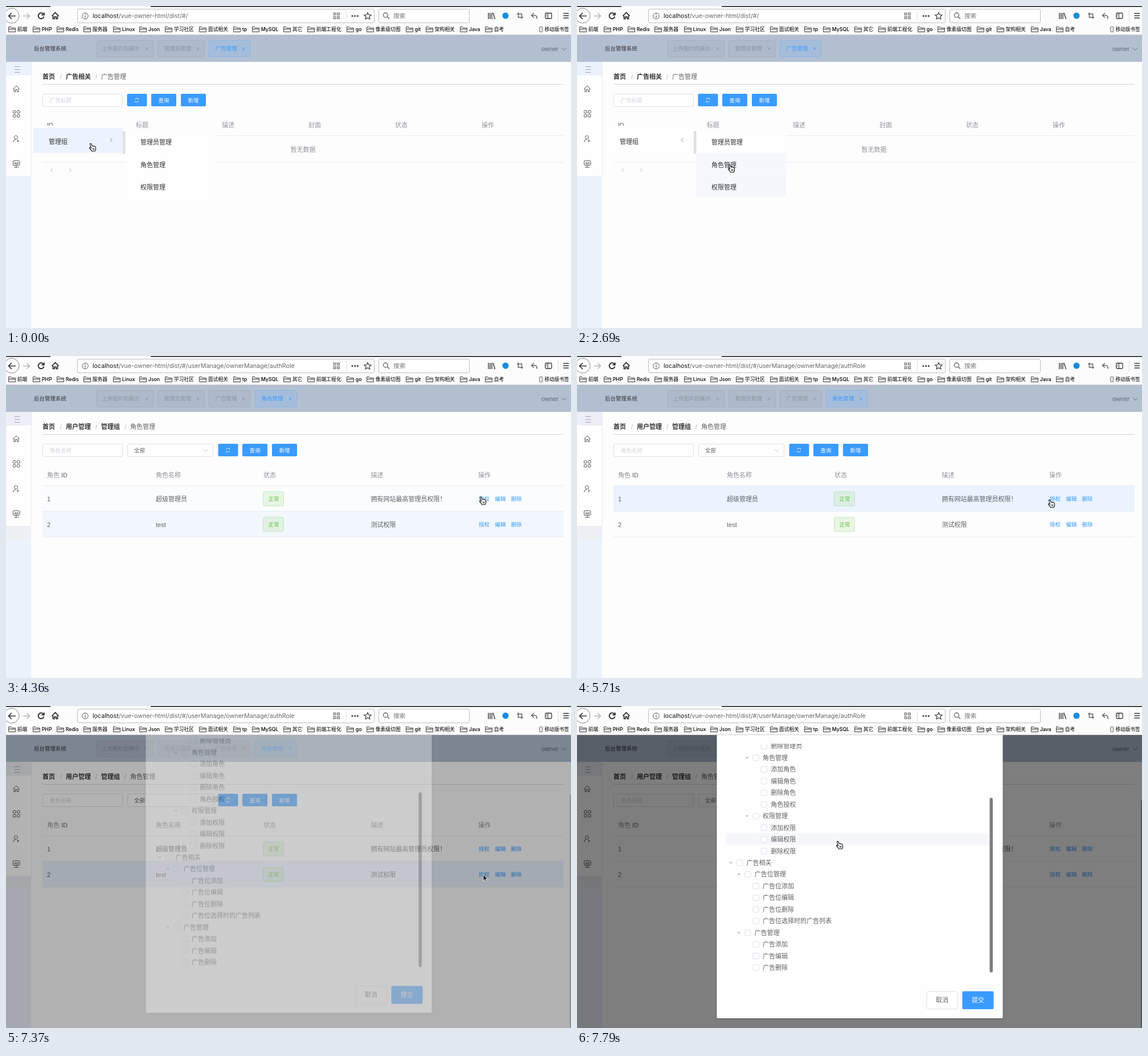
Animation, 992 px wide and 565 px high, one loop 8 s. Source, as an HTML page:

```html
<!DOCTYPE html>
<html lang="zh-CN">
<head>
<meta charset="utf-8">
<title>后台管理系统</title>
<style>
  html, body { margin: 0; width: 100%; height: 100%; overflow: hidden; background: #fdfdfd; }
  svg { display: block; width: 100vw; height: 100vh; font-family: "Liberation Sans", "Noto Sans CJK SC", "Noto Sans CJK", sans-serif; }
  .ui { font-family: Inter, "Noto Sans CJK SC", "Noto Sans CJK", sans-serif; }
  text { white-space: pre; }
</style>
</head>
<body>
<svg id="stage" viewBox="0 0 992 565"></svg>
<script>
const BLUE = '#3a9bff', HOVER = '#ebf3fe', GRAY = '#909399', BODY = '#606266', DARK = '#303133', EDGE = '#dcdfe6';

const rect = (x, y, w, h, fill, extra = '') =>
  `<rect x="${x}" y="${y}" width="${w}" height="${h}" fill="${fill}" ${extra}/>`;
const box = (x, y, w, h, fill, stroke, r = 2.5) =>
  rect(x + .5, y + .5, w - 1, h - 1, fill, `stroke="${stroke}" rx="${r}"`);
const text = (x, y, s, fill = BODY, size = 11, extra = '') =>
  `<text x="${x}" y="${y + size * .36}" fill="${fill}" font-size="${size}" ${extra}>${s}</text>`;
const path = (d, stroke = '#333', width = 1, fill = 'none') =>
  `<path d="${d}" stroke="${stroke}" stroke-width="${width}" fill="${fill}"/>`;
const circle = (x, y, r, fill = 'none', stroke = 'none', width = 1) =>
  `<circle cx="${x}" cy="${y}" r="${r}" fill="${fill}" stroke="${stroke}" stroke-width="${width}"/>`;
const rule = (x1, x2, y, color = '#e8ebf1') => path(`M${x1} ${y}H${x2}`, color);
const group = (id, content, extra = '') => `<g id="${id}" ${extra}>${content}</g>`;
const highlight = (id, x, y, w, h) => rect(x, y, w, h, HOVER, `id="${id}"`);
const BOLD = 'font-weight="700"', MEDIUM = 'font-weight="500"';
const ID_LABEL = `<tspan ${BOLD}>ID</tspan>`;

function browser() {
  const folder = x => path(`M${x + .5} 45.5V36.5H${x + 4.5}L${x + 6} 38.5H${x + 12.5}V45.5Z`, '#4a4a4a', 1, '#e4e4e4')
    + path(`M${x + .5} 40.5H${x + 12.5}`, '#4a4a4a');
  const bookmarks = [[4, '前端'], [47, 'PHP'], [89, 'Redis'], [136, '服务器'], [188, 'Linux'], [234, 'Json'],
    [279, '学习社区'], [339, '面试相关'], [399, 'tp'], [432, 'MySQL'], [487, '其它'], [529, '前端工程化'], [598, 'go'],
    [633, '像素级切图'], [702, 'git'], [737, '架构相关'], [797, 'Java'], [841, '自考']];
  const grid = [[575, 12], [581.5, 12], [575, 18.5], [581.5, 18.5]]
    .map(([x, y]) => rect(x, y, 4, 4, '#ccc', 'stroke="#777"')).join('');
  return rect(0, 0, 992, 51, '#fcfcfc') + rect(0, 0, 78, 1.5, '#111') + rect(254, 0, 738, 1.5, '#111')
    + rule(0, 992, 50.5, '#cfcfcf')
    + circle(10, 17, 13, '#fff', '#888') + path('M17 17.5H5M10 12L4.5 17.5L10 23', '#333', 1.7)
    + path('M30 17.5H41M36.5 12.5L41.5 17.5L36.5 22.5', '#b5b5b5', 1.5)
    + path('M65.5 14A5 5 0 1 0 66.5 18.5M66.8 11.5V15.5H62.5', '#222', 1.8)
    + path('M80.5 17.5L86.5 11.5L92.5 17.5M82.5 17V22.5H85V19H88V22.5H90.5V17', '#222', 1.6)
    + box(125, 5, 522, 25, '#fff', '#bdbdbd') + circle(139, 17.5, 5.2, 'none', '#555') + path('M139 16.5V20.5M139 14V15.3', '#555', 1.2)
    + `<text x="152" y="21" font-size="10.7" fill="#666"><tspan fill="#111">localhost</tspan><tspan id="route"></tspan></text>`
    + grid + path('M597.5 9V26', '#ddd') + [608, 612.7, 617.4].map(x => circle(x, 17.5, 1.6, '#444')).join('')
    + path('M635 11.5L636.8 15.4L641 15.9L637.9 18.7L638.8 23L635 20.8L631.2 23L632.1 18.7L629 15.9L633.2 15.4Z', '#444', 1.3)
    + box(654, 5, 160, 25, '#fff', '#bdbdbd') + circle(666.5, 16, 4, 'none', '#666', 1.3) + path('M669.5 19L673 22.5', '#666', 1.5)
    + text(680, 17.5, '搜索', '#777', 10.7)
    + path('M847 12V23M850 12V23M853 12V23M855 12L858.5 23', '#333', 1.4) + circle(877, 17, 5.5, '#168be0')
    + path('M899.5 11.5V20H908M897 14H905.5V22.5', '#666', 1.6)
    + path('M927 12.5L922.5 16.5L927 20.5M923 16.5H929Q932.5 17 932 22.5', '#666', 1.6)
    + rect(947, 12.5, 11, 9.5, 'none', 'stroke="#333" stroke-width="1.3" rx="1.5"') + path('M951.5 12.5V22M948.5 15H950M948.5 17.5H950', '#333')
    + path('M969.5 7V27', '#ddd') + path('M978.5 13H988M978.5 17H988M978.5 21H988', '#333', 1.5)
    + bookmarks.map(([x, s]) => folder(x) + text(x + 15.7, 41.3, s, '#000', 8.8, MEDIUM)).join('')
    + rect(936.5, 36.5, 5.5, 9, '#e4e4e4', 'stroke="#777" rx="1"') + text(945.5, 40.8, '移动版书签', '#000', 8.6, MEDIUM);
}

function tab(x, w, label, active) {
  const color = active ? BLUE : '#8b95a3', end = x + w - 12;
  return box(x, 60, w, 30, active ? '#a4bddb' : '#aeb9c9', active ? '#8fb5e0' : '#a5afbd')
    + text(x + (w > 90 ? 9 : 11.5), 75, label, color, 9.5) + path(`M${end - 2.5} 72.5l5 5m0 -5l-5 5`, color, .9);
}

function frameOfApp() {
  return rect(0, 51, 992, 514, '#fdfdfd') + rect(0, 51, 992, 47, '#b2bfd1')
    + text(49, 75, '后台管理系统', DARK, 9.5)
    + tab(159, 100, '上传图片的展示') + tab(266, 83, '管理员管理')
    + text(940, 75, 'owner', '#606975') + path('M976 73.5L980 77.5L984 73.5', '#606975')
    + rect(0, 98, 44, 467, '#ecf2fa') + rect(0, 122, 44, 176, '#fefefe') + path('M44.5 98V298', '#e9ecf1')
    + path('M12.5 145.5L18 140L23.5 145.5M14 144.5V150.5H16.5V146.5H19.5V150.5H22V144.5', '#555')
    + [[12.5, 183.5], [19.5, 183.5], [12.5, 190.5], [19.5, 190.5]].map(([x, y]) => rect(x, y, 4.5, 4.5, 'none', 'stroke="#555" rx="1"')).join('')
    + circle(17.5, 230.5, 3, 'none', '#555') + path('M12.5 239Q13 234.5 17 233.7M20.5 234.5V239M20.5 236.5H23', '#555')
    + rect(12.5, 271.5, 11.5, 8, 'none', 'stroke="#555" rx="1.5"') + text(14.3, 275.7, 'AD', '#444', 5.5, BOLD)
    + path('M18 279.5V283M14 283H22.5', '#555') + rule(64, 979, 137.5, '#d6d6d6');
}

const menuToggle = fill => rect(0, 98, 44, 24, fill) + path('M15 106.5H24.5M15 111.5H24.5M15 116.5H24.5', '#a0a4aa');
const crumbs = list => list.map(([x, s], i) => {
  const last = i === list.length - 1;
  return text(x, 124, s, last ? BODY : DARK, 11, last ? '' : BOLD) + (i ? text(x - 10, 124, '/', '#b5b8bf') : '');
}).join('');
const field = label => box(64, 154, 141, 23, '#fefefe', EDGE) + text(77, 165.5, label, '#d0d3da', 9.5);
const buttons = x => [[0, 35], [42.5, 44], [94.5, 44]].map(([dx, w]) => rect(x + dx, 154, w, 22, BLUE, 'rx="2"')).join('')
  + path(`M${x + 14} 164a3.3 3.3 0 0 1 6 -.5v-1.8M${x + 20} 166.5a3.3 3.3 0 0 1 -6 .5v1.8`, '#fff', .9)
  + text(x + 55, 165.5, '查询', '#fff', 9.5, MEDIUM) + text(x + 107, 165.5, '新增', '#fff', 9.5, MEDIUM);
const heads = list => list.map(([x, s]) => text(x, 209.5, s, GRAY, 11, MEDIUM)).join('') + rule(64, 979, 227.5);

function adsPage() {
  const items = ['管理员管理', '角色管理', '权限管理'];
  return menuToggle('#eaf2fc') + tab(356, 73, '广告管理', true)
    + crumbs([[64, '首页'], [105, '广告相关'], [167, '广告管理']])
    + field('广告标题') + buttons(212.5)
    + heads([[72, ID_LABEL], [228, '标题'], [379, '描述'], [531, '封面'], [683, '状态'], [835, '操作']])
    + text(499.5, 252, '暂无数据', GRAY) + rule(64, 979, 274.5)
    + path('M82 284.5L78.5 288L82 291.5M111 284.5L114.5 288L111 291.5', '#b4b8c0')
    + rect(48, 210, 161, 52, '#fefefe') + rect(209, 219, 158, 121, '#fefefe')
    + rect(205, 220, 4.5, 39.5, '#dedede') + highlight('menu', 48, 214, 157.5, 44)
    + text(75, 238, '管理组', DARK) + path('M186.5 231.5L183 235L186.5 238.5', GRAY)
    + items.map((s, i) => highlight('item' + i, 209, 218.5 + 39.2 * i, 158, 39) + text(236, 239.5 + 39.2 * i, s, DARK)).join('');
}

function rolesPage() {
  const row = (i, id, name, note) => {
    const y = 250.5 + 45 * i;
    return highlight('row' + i, 64, y - 22.5, 915, 44.5) + rule(64, 979, y + 22)
      + text(72, y + .5, id) + text(263, y + .5, name) + text(640.5, y + .5, note)
      + rect(451.5, y - 12.5, 36, 25, '#67c23a', 'rx="2.5" fill-opacity=".12" stroke="#67c23a" stroke-opacity=".3"')
      + text(460.5, y, '正常', '#67c23a', 9.5)
      + [[830, '授权'], [858.5, '编辑'], [886.5, '删除']].map(([x, s]) => text(x, y, s, BLUE, 9.5, MEDIUM)).join('');
  };
  return menuToggle('#eceff5') + rect(0, 298, 44, 23, '#edeff4')
    + tab(356, 73, '广告管理') + tab(437, 74, '角色管理', true)
    + crumbs([[64, '首页'], [105, '用户管理'], [167, '管理组'], [218, '角色管理']])
    + field('角色名称') + box(213, 154, 151, 23, '#fefefe', EDGE) + text(225, 165.5, '全部', BODY, 9.5)
    + path('M346.5 163.5L350.5 167.5L354.5 163.5', '#c0c4cc') + buttons(372.5)
    + heads([[72, '角色 ' + ID_LABEL], [263, '角色名称'], [452, '状态'], [640.5, '描述'], [829, '操作']])
    + row(0, 1, '超级管理员', '拥有网站最高管理员权限！') + row(1, 2, 'test', '测试权限');
}

function dialog() {
  // Each entry is depth followed by label; "+" marks an expanded branch.
  const tree = ['3删除管理员', '2+角色管理', '3添加角色', '3编辑角色', '3删除角色', '3角色授权', '2+权限管理', '3添加权限',
    '3编辑权限', '3删除权限', '0+广告相关', '1+广告位管理', '2广告位添加', '2广告位编辑', '2广告位删除',
    '2广告位选择时的广告列表', '1+广告管理', '2广告添加', '2广告编辑', '2广告删除'];
  const nodes = tree.map((entry, i) => {
    const x = 285.6 + 14.2 * entry[0], y = 70.5 + 20.45 * i, open = entry[1] === '+';
    return box(x - 5.5, y - 5.5, 11, 11, '#fff', EDGE, 1.5) + text(x + 12, y, entry.slice(open ? 2 : 1))
      + (open ? path(`M${x - 18.5} ${y - 1.5}h6l-3 3.5z`, 'none', 0, '#c0c4cc') : '');
  }).join('');
  return rect(245.5, -60, 502, 608, '#fefefe', 'rx="2" filter="url(#shadow)"')
    + rect(261, 223.5, 463, 20.5, '#f5f7fa', 'id="node"')
    + `<g clip-path="url(#treeArea)">${nodes}</g>`
    + rect(724.5, 161, 5.5, 306.5, '#7f7f7f', 'rx="2.7"') + rect(990, 165, 2, 420, '#555')
    + box(613.5, 500.5, 55.5, 31.5, '#fff', EDGE) + text(630, 516.5, '取消')
    + rect(676.5, 500.5, 55, 31.5, BLUE, 'rx="2.5"') + text(693, 516.5, '提交', '#fff', 11, MEDIUM);
}

const stage = document.getElementById('stage');
stage.innerHTML = `<defs>
    <clipPath id="treeArea"><rect x="250" y="66" width="474" height="420"/></clipPath>
    <clipPath id="viewport"><rect y="51" width="992" height="514"/></clipPath>
    <filter id="shadow"><feDropShadow dx="0" dy="1" stdDeviation="1.5" flood-opacity=".3"/></filter>
  </defs>`
  + frameOfApp() + group('ads', adsPage()) + group('roles', rolesPage())
  + rect(0, 51, 992, 514, '#000', 'id="shade"')
  + `<g clip-path="url(#viewport)">${group('dialog', dialog())}</g>` + group('browser', browser(), 'class="ui"')
  + group('hand', path('M-4.6 -6.2q1.4-1.3 2.4.3L-.6-2.3q1-.7 2 .1q1.2-.5 2 .5q1.6-.2 1.9 1.3L5.6 2.6Q5.4 4.6 4.2 6.8H-1.4Q-2.8 4-5.3 1.5Q-6-.2-4 0L-2.6 1Z M.6 1.5V4.5M2.6 1.5V4.5', '#111', 1.1, '#fff'))
  + group('arrow', path('M0 0V10.5L2.4 8.3L4 12L5.8 11.2L4.2 7.7H7.4Z', '#fff', .8, '#111'));

// [time, x, y, arrow?]
const pointer = [[0, 152, 248], [150, 175, 256], [350, 214, 271], [560, 240, 281],
  [1180, 248, 274], [1330, 258, 248], [1480, 262, 240], [1630, 264, 262], [1780, 266, 290], [1930, 267, 314],
  [2070, 267, 320], [2220, 266, 321], [2520, 269, 300], [2690, 271, 285],
  [3410, 305, 284, 1], [3600, 430, 282, 1], [3790, 610, 276, 1], [3980, 745, 268, 1], [4170, 818, 258, 1],
  [4360, 837, 254], [4810, 838, 254], [5260, 837, 257], [5710, 833, 259], [5860, 829, 261], [6010, 830, 264],
  [6160, 834, 263], [6450, 836, 267], [6600, 837, 274, 1], [6750, 838, 281, 1], [6900, 839, 290], [7050, 839, 297],
  [7220, 838, 296, 1], [7520, 650, 270, 1], [7790, 461, 244]];

// Highlight strength per element from each time on.
const hovers = [[0, { menu: 1 }], [350, { menu: .5, item1: .5 }], [560, { item1: 1 }],
  [1330, { item0: .5, item1: .5 }], [1480, { item0: 1 }], [1630, { item0: .5, item1: .5 }], [1780, { item1: 1 }],
  [1930, { item1: .5, item2: .5 }], [2070, { item2: 1 }], [2220, { item1: .5, item2: .5 }],
  [2990, { row1: .5 }], [3140, { row1: 1 }], [4360, { row0: .2, row1: .6 }], [4510, { row0: 1 }],
  [6600, { row0: .5, row1: .5 }], [6750, { row1: 1 }], [7520, {}], [7790, { node: 1 }]];

// [time, shade opacity, dialog opacity, dialog offset]
const modal = [[0, 0, 0, -20], [7370, .3, .35, -9.4], [7520, .5, 1, -1], [7790, .5, 1, 0]];

const $ = id => document.getElementById(id);
const at = (track, t) => track.findLast(key => key[0] <= t);
const show = (id, opacity) => $(id).setAttribute('opacity', Number(opacity));
const move = (id, x, y) => $(id).setAttribute('transform', `translate(${x} ${y})`);

function draw(t) {
  const onRoles = t >= 2990;
  show('ads', !onRoles);
  show('roles', onRoles);
  $('route').textContent = '/vue-owner-html/dist/#/' + (onRoles ? 'userManage/ownerManage/authRole' : '');

  const active = at(hovers, t)[1];
  for (const id of ['menu', 'item0', 'item1', 'item2', 'row0', 'row1', 'node']) show(id, active[id] || 0);

  const [, shade, opacity, offset] = at(modal, t);
  show('shade', shade);
  show('dialog', opacity);
  move('dialog', 0, offset);

  const [, x, y, arrow] = at(pointer, t);
  show('arrow', !!arrow);
  show('hand', !arrow);
  move('arrow', x, y);
  move('hand', x, y);
}

function tick() {
  draw(performance.now() % 8000);
  requestAnimationFrame(tick);
}
tick();
</script>
</body>
</html>
```
